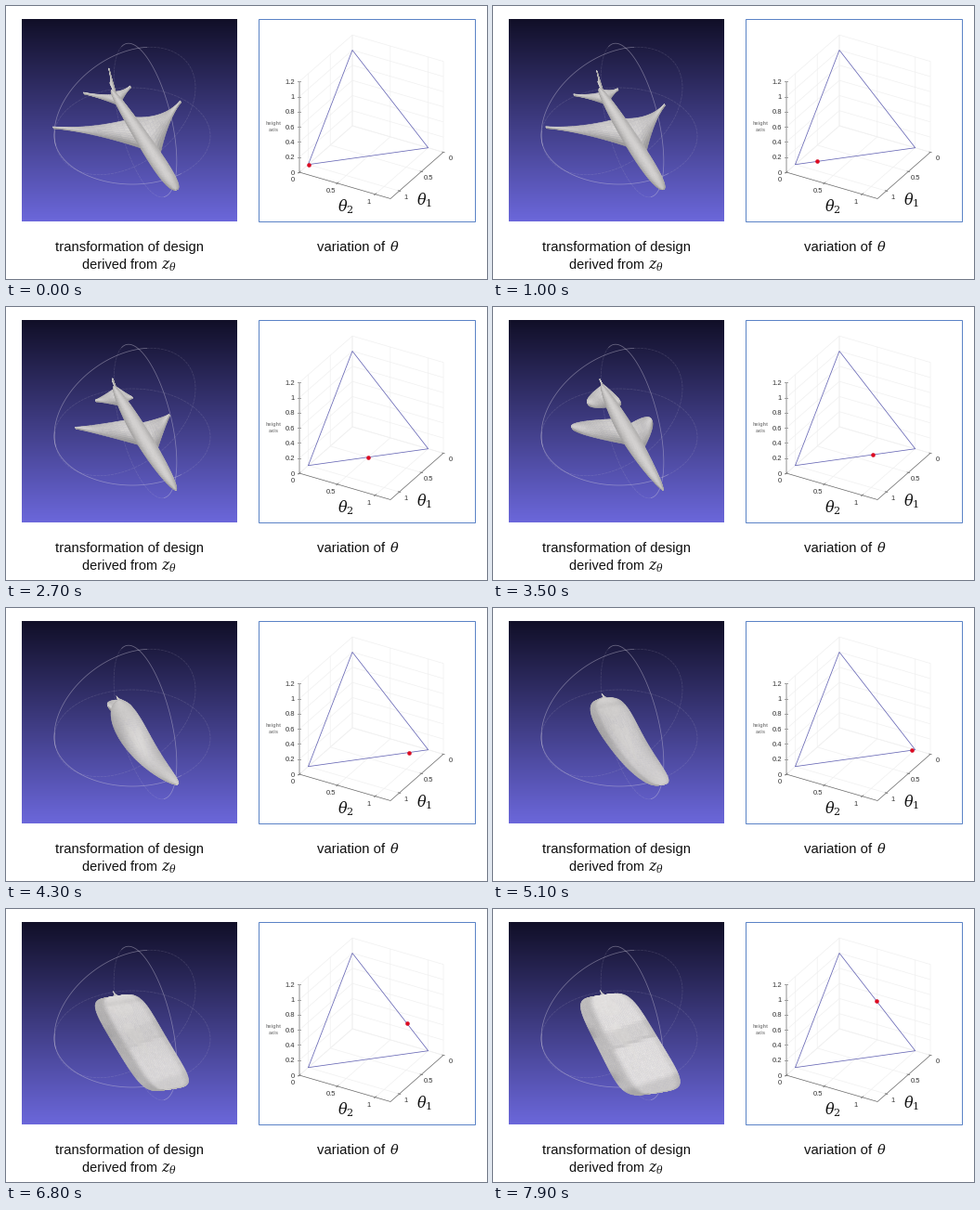
Animation of 518 by 294 pixels, one loop 8 s. Source, as a matplotlib script:

```python
import numpy as np
import matplotlib.pyplot as plt
from matplotlib.animation import FuncAnimation
from matplotlib.collections import PolyCollection
from matplotlib.patches import Rectangle

W, H = 518, 294
FRAMES, STEP = 80, 100
PX = 0.72  # one pixel in points at 100 dpi

plt.rcParams["font.family"] = "Liberation Sans"
fig = plt.figure(figsize=(W / 100, H / 100), dpi=100, facecolor="white")
ax = fig.add_axes([0, 0, 1, 1])
rng = np.random.default_rng(4)


def step(x, lo, hi):
    x = np.clip((x - lo) / (hi - lo), 0, 1)
    return x * x * (3 - 2 * x)


def bump(x, mid, width):
    return np.exp(-((x - mid) / width) ** 2)


def tween(times, values, t):
    i = int(np.clip(np.searchsorted(times, t, "right") - 1, 0, len(times) - 2))
    f = np.clip((t - times[i]) / (times[i + 1] - times[i]), 0, 1)
    return values[i] * (1 - f) + values[i + 1] * f


# ---- body: a bowed axis with a superellipse outline ----
# tail x, y, nose x, y, bow, half width at tail and nose, squareness
STAGES = [0, 3.5, 4.3, 6, 7.9]
BODY = np.array([
    (114, 91, 183, 198, 0, 5, 11, 2.6),    # plane
    (117, 84, 183, 197, 2, 10, 9, 1.6),    # dart
    (122, 100, 184, 190, 9, 20, 11, 2.2),  # blob
    (117, 95, 178, 191, 2, 27, 22, 5),     # shoe
    (117, 93, 175, 198, 0, 30, 35, 5),     # car
], float)
ACROSS = np.array([1, -0.15])
CHORD = np.array([0.4, 0.9])

# ---- wings and tail: place on the axis, half chords, tip when plane, dart and blob ----
SURFACES = [
    (0.10, (6, 12), [(84, 94), (102, 104), (110, 106)]),
    (0.08, (7, 12), [(134, 87), (137, 102), (136, 108)]),
    (0.06, (15, 12), [(111, 68), (117, 82), (130, 110)]),
    (0.44, (18, 15), [(51, 131), (85, 130), (128, 130)]),
    (0.53, (30, 17), [(188, 103), (171, 122), (145, 132)]),
]


def axis_point(pose, v):
    tail, nose, bow = pose[:2], pose[2:4], pose[4]
    v = np.asarray(v)[..., None]
    return tail + (nose - tail) * v + 4 * v * (1 - v) * bow * np.array([-0.84, 0.54])


def body_edges(t, s):
    pose = tween(STAGES, BODY, t)
    v = (1 - np.cos(np.pi * s)) / 2
    tail_w, nose_w, power = pose[5:]
    half = tail_w + (nose_w - tail_w) * v
    half = half * (1 - np.abs(2 * v - 1) ** power) ** (1 / power)
    mid, side = axis_point(pose, v), half[:, None] * ACROSS
    return mid - side, mid + side


def surface_edges(surface, t, s):
    place, chords, tips = surface
    age = min(t / 3.5, 1) ** 1.35
    root = axis_point(tween(STAGES, BODY, t), place)
    tips = np.array(tips, float)
    tip = tips[0] * (1 - age) + tips[1] * age
    tip = tip + (tips[2] - tip) * step(t, 3.5, 4.3)
    half = chords[0] + (chords[1] - chords[0]) * age
    v = (1 - (1 - s) ** 2)[:, None]
    mid = root + (tip - root) * v
    side = CHORD * (half * (1 - v) ** (1.8 - 1.3 * age ** 2) + 1.1)
    return mid - side, mid + side


def body_looks(u, s):
    """Grey levels of the body at each stage."""
    v = (1 - np.cos(np.pi * s)) / 2
    plane = 150 + 62 * np.sin(np.pi * (0.06 + 0.8 * u)) - 12 * step(v, 0.85, 1)
    blob = 160 + 52 * np.sin(np.pi * (0.08 + 0.72 * u)) + 7 * np.cos(9 * v + 4 * u)
    shoe = 172 + 38 * step(u, 0.14, 0.26) - 20 * step(u, 0.85, 1) + 6 * np.cos(8 * v)
    shoe = shoe - 20 * bump(v, 0.07, 0.025) * step(u, 0.15, 0.3)
    slant = v + 0.1 * (u - 0.5)
    top = step(u, 0.16, 0.3)
    car = 192 + 34 * top - 18 * step(u, 0.88, 1) - 22 * step(slant, 0.86, 0.93)
    car = car - 14 * step(slant, 0.32, 0.36) * (1 - step(slant, 0.48, 0.52)) * top
    car = car - 16 * bump(slant, 0.5, 0.015) * top
    for wheel in (0.35, 0.8):
        car = car - 24 * bump(v, wheel, 0.06) * bump(u, 0, 0.09)
    return np.array([plane, plane, blob, shoe, car])


def wing_look(u, s):
    return 190 + 20 * np.sin(np.pi * u) - 34 * u ** 3 + 7 * np.sin(9 * s + 4 * u)


def cell_centers(nv, nu):
    return np.meshgrid((np.arange(nu) + 0.5) / nu, (np.arange(nv) + 0.5) / nv)


def quads(edges, nu):
    u = np.linspace(0, 1, nu + 1)[None, :, None]
    a, b = (e[:, None] for e in edges)
    g = a * (1 - u) + b * u
    corners = (g[:-1, :-1], g[1:, :-1], g[1:, 1:], g[:-1, 1:])
    return np.stack(corners, 2).reshape(-1, 4, 2)


BODY_V, BODY_U, WING_V, WING_U = 60, 28, 24, 10
body_grey = body_looks(*cell_centers(BODY_V, BODY_U)[::1])
body_grey = body_grey + rng.normal(0, 1.5, (BODY_V, BODY_U))
wing_grey = wing_look(*cell_centers(WING_V, WING_U)) + rng.normal(0, 2, (WING_V, WING_U))


def model(t):
    """Quads and colours of the whole object, back to front."""
    s = np.linspace(0, 1, WING_V + 1)
    verts = [quads(surface_edges(f, t, s), WING_U) for f in SURFACES]
    verts.append(quads(body_edges(t, np.linspace(0, 1, BODY_V + 1)), BODY_U))
    grey = [wing_grey.ravel()] * len(SURFACES) + [tween(STAGES, body_grey, t).ravel()]
    colors = np.concatenate(grey)[:, None] / 255 * [1, 0.99, 0.985]
    return np.concatenate(verts), np.clip(colors, 0, 1)


# ---- left panel ----
shade = np.linspace(0, 1, 218)[:, None, None]
sky = np.array([17, 15, 40]) * (1 - shade) + np.array([107, 103, 218]) * shade
ax.imshow(sky / 255, extent=(17, 249, 232, 14), aspect="auto", interpolation="bilinear")


def ring(center, a, b, start, end, alpha, style="-"):
    t = np.linspace(start, end, 90)[:, None]
    p = np.array(center) + np.array(a) * np.cos(t) + np.array(b) * np.sin(t)
    ax.plot(p[:, 0], p[:, 1], color="#cfcadb", lw=0.55, alpha=alpha, ls=style)


PI = np.pi
for center, a, b, start, end in [
    ((136, 140), (84, 0), (0, 52), 0.9, PI + 0.1),
    ((128, 113), (76, -25), (0, 64), PI - 0.2, 1.6 * PI),
    ((150, 123), (-20.4, -82.5), (27, -7), -0.2, PI),
]:
    ring(center, a, b, start, end, 0.45)
    ring(center, a, b, end, start + 2 * PI, 0.16, (0, (4, 1)))

mesh = PolyCollection([], linewidths=0.4, zorder=4)
ax.add_collection(mesh)


# ---- right panel ----
ax.add_patch(Rectangle((272, 14), 233, 218, fill=False, ec="#5b83c6", lw=PX))


def project(a, b, c):
    return np.array([373 - 47.5 * a + 81.7 * b, 129 + 41.7 * a + 23.7 * b - 81.5 * c])


def line(points, color, width):
    x, y = np.transpose([project(*p) for p in points])
    ax.plot(x, y, color=color, lw=width, zorder=3, solid_capstyle="butt")


def label(x, y, text, px, color="#111111", **kw):
    kw = {"ha": "center", "va": "center", **kw}
    ax.text(x, y, text, fontsize=px * PX, color=color, zorder=6, **kw)


M = 1.2
GRID, AXIS, TICK = "#f0f0f0", "#6a6a6a", "#333333"
for q in (0, 0.5, 1, M):
    line([(q, M, 0), (q, 0, 0), (q, 0, M)], GRID, 0.5)
    line([(M, q, 0), (0, q, 0), (0, q, M)], GRID, 0.5)
for z in np.arange(0, 1.3, 0.2):
    line([(M, 0, z), (0, 0, z), (0, M, z)], GRID, 0.5)
    x, y = project(M, 0, z)
    ax.plot([x - 2, x + 1], [y, y], color=AXIS, lw=0.5)
    label(x - 5, y, f"{z:.1f}".replace(".0", ""), 7.6, TICK, ha="right", va="center_baseline")

line([(M, 0, M), (M, 0, 0), (M, M, 0), (0, M, 0)], AXIS, 0.5)
for q in (0, 0.5, 1):
    line([(M - 0.03, q, 0), (M + 0.03, q, 0)], AXIS, 0.5)
    line([(q, M - 0.02, 0), (q, M + 0.02, 0)], AXIS, 0.5)
    x, y = project(M, q, 0)
    label(x - 7, y + 8.5, f"{q:g}", 7.6, TICK)
    x, y = project(q, M, 0)
    label(x + 7.5, y + 7, f"{q:g}", 7.6, TICK)

CORNERS = np.eye(3)
line(CORNERS[[0, 1, 2, 0]], "#6464b4", 0.55)
dot, = ax.plot([], [], "o", ms=3.9 * PX, mfc="#e0081e", mec="#d0102a", mew=0.4, zorder=5)

MATH = {"math_fontfamily": "dejavuserif"}
label(288, 126.5, "height", 5.6, "#8c8c8c", weight="bold")
label(288, 133.5, "axis", 5.6, "#8c8c8c", weight="bold")
label(366, 216, r"$\theta_2$", 16, **MATH)
label(451, 209, r"$\theta_1$", 16, **MATH)

# ---- captions ----
TEXT = 14.9
label(133, 264, "transformation of design", TEXT, va="baseline")
label(81.5, 283, "derived from", TEXT - 0.4, ha="left", va="baseline")
label(167, 283, r"$z_\theta$", 15.5, ha="left", va="baseline", **MATH)
label(335, 264, "variation of", TEXT, ha="left", va="baseline")
label(413, 264, r"$\theta$", 14.5, ha="left", va="baseline", **MATH)

# progress of the dot around the triangle, one unit per side
DOT_TIME = [0, 3.5, 4.3, 5.3, 5.48, 7.9]
DOT_SIDE = [0, 0.646, 0.838, 1, 1, 1.51]

ax.set_xlim(0, W)
ax.set_ylim(H, 0)
ax.axis("off")


def draw(frame):
    t = frame * STEP / 1000
    verts, colors = model(t)
    mesh.set_verts(verts)
    mesh.set_facecolor(colors)
    mesh.set_edgecolor(colors)
    side = np.interp(t, DOT_TIME, DOT_SIDE)
    x, y = project(*tween([0, 1, 2], CORNERS, side))
    dot.set_data([x], [y])
    return mesh, dot


anim = FuncAnimation(fig, draw, frames=FRAMES, interval=STEP, repeat=True, blit=False)
plt.show()
```
